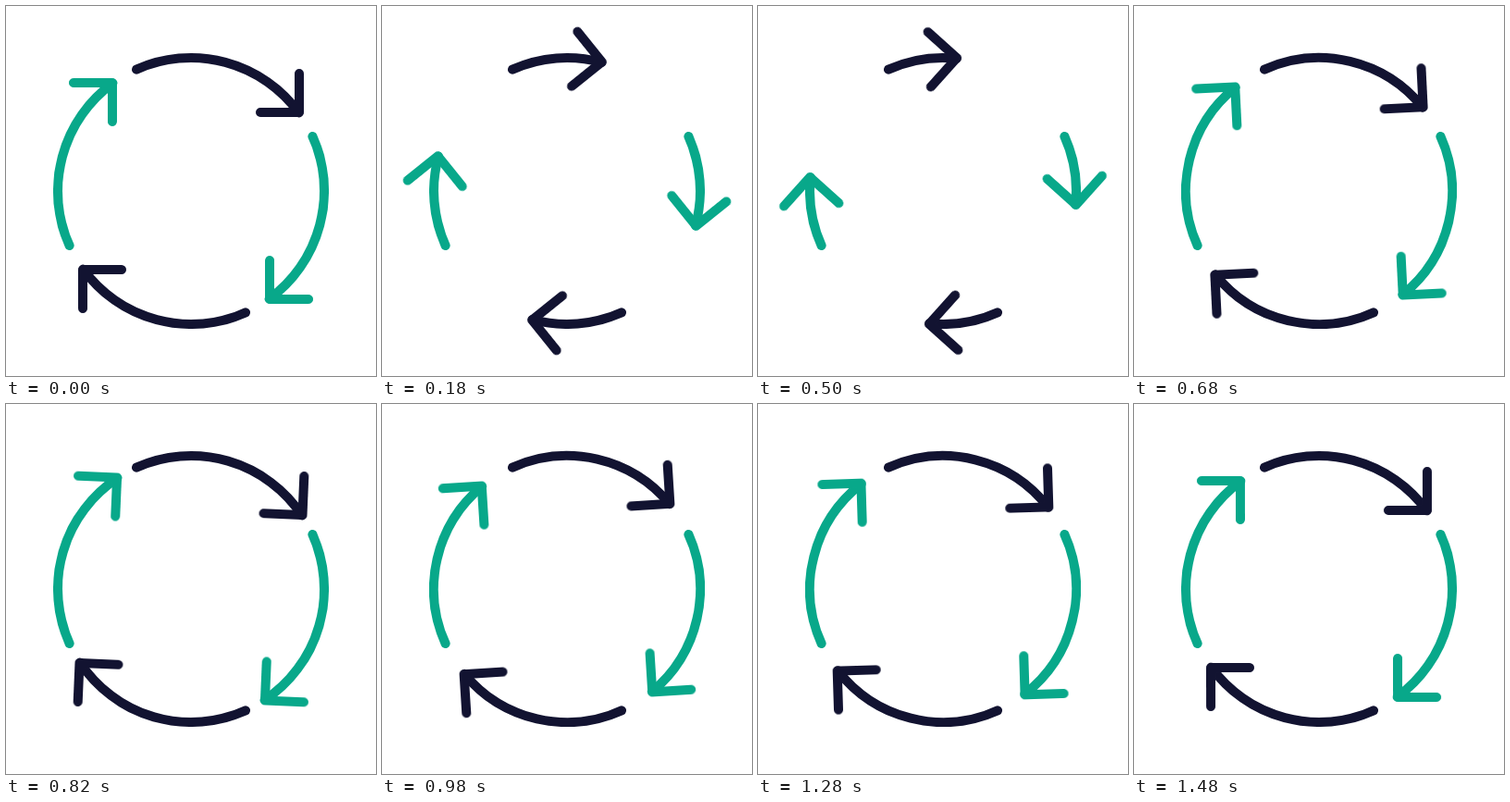
Write an HTML page that moves like this. It is 400x400 px and loops after 1520 ms.

```html
<!DOCTYPE html>
<html lang="en">
<head>
<meta charset="utf-8">
<title>Cycle arrows</title>
<style>
  html, body { margin: 0; width: 100%; height: 100%; overflow: hidden; background: #fff; }
  svg { display: block; width: 100vw; height: 100vh; }
  path { fill: none; stroke-width: 10; stroke-linecap: round; stroke-linejoin: round; }
  .head { transform-origin: 0 0; }
</style>
</head>
<body>
<svg viewBox="-200 -200 400 400"></svg>
<script>
const NS = 'http://www.w3.org/2000/svg';
const LOOP = 1520;
const RADIUS = 144;
const START = -24.2;  // degrees clockwise from the top
const TIP = 54;
const SPARE = 12;     // room for the overshoot
const SMOOTH = 'cubic-bezier(.333,0,.667,1)';

// time in ms, swing of the tip in degrees, easing to the next step
const STEPS = [
  [0, 0, SMOOTH],
  [280, -54.5, 'cubic-bezier(1,0,.6,1)'],
  [760, 3.5, SMOOTH],
  [1020, -4.1, SMOOTH],
  [1500, 0, 'linear'],
  [LOOP, 0, 'linear']
];

const svg = document.querySelector('svg');

function add(parent, tag, attrs) {
  const el = document.createElementNS(NS, tag);
  for (const key in attrs) el.setAttribute(key, attrs[key]);
  return parent.appendChild(el);
}

function point(deg) {
  const a = deg * Math.PI / 180;
  return `${RADIUS * Math.sin(a)} ${-RADIUS * Math.cos(a)}`;
}

function play(el, style) {
  const frames = STEPS.map(([time, swing, easing]) =>
    ({ offset: time / LOOP, easing, ...style(swing) }));
  el.animate(frames, { duration: LOOP, iterations: Infinity }).startTime = 0;
}

const span = TIP + SPARE - START;
for (let i = 0; i < 4; i++) {
  const arrow = add(svg, 'g', {
    transform: `rotate(${i * 90})`,
    stroke: i % 2 ? '#08a88a' : '#121331'
  });
  const shaft = add(arrow, 'path', {
    d: `M${point(START)}A${RADIUS} ${RADIUS} 0 0 1 ${point(TIP + SPARE)}`,
    pathLength: span,
    'stroke-dasharray': `${span} 400`
  });
  const head = add(arrow, 'path', { class: 'head', d: 'M117 -127V-85H75' });
  play(shaft, swing => ({ strokeDashoffset: `${SPARE - swing}px` }));
  play(head, swing => ({ transform: `rotate(${swing}deg)` }));
}
</script>
</body>
</html>
```
